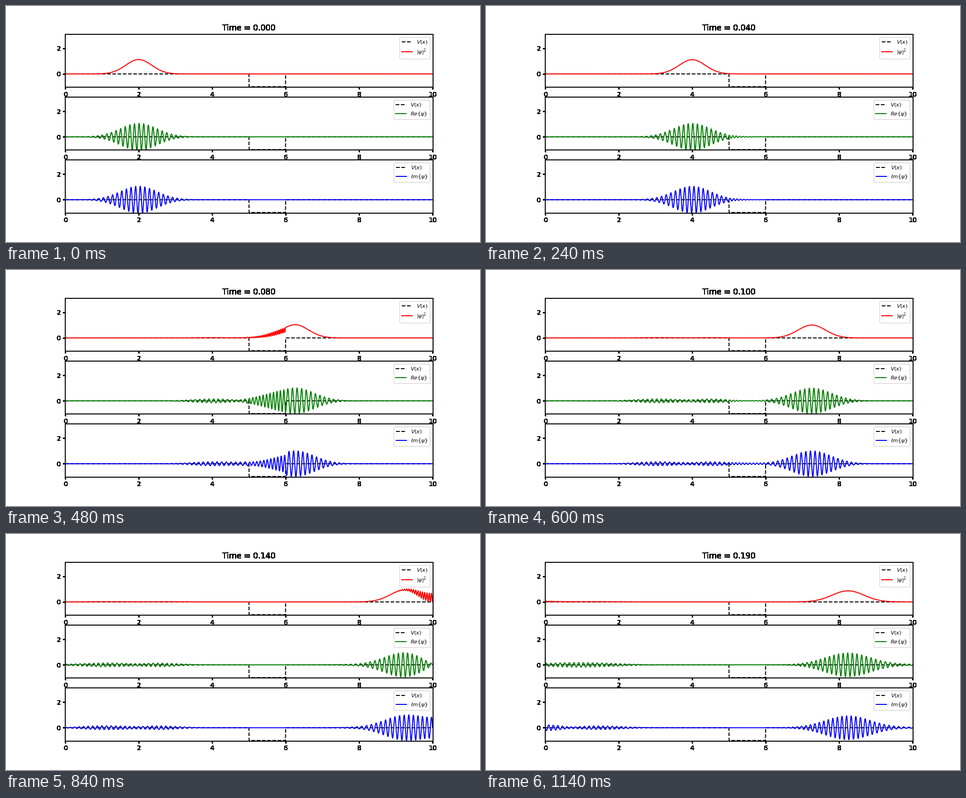
Animation of 1000x500 px, one loop 1.2 s. Source, as a matplotlib script:

```python
import numpy as np
import matplotlib.pyplot as plt
from matplotlib.animation import FuncAnimation

FRAMES, INTERVAL, DT = 20, 60, 0.01

# Wave packet in a box [0, L] with a square well on [A, B] (hbar = m = 1)
L, A, B, DEPTH = 10.0, 5.0, 6.0, 1000.0
K0, X0, SIGMA = 50.0, 2.0, 0.5
MODES = 600

x = np.linspace(0, L, 2001)
n = np.arange(1, MODES + 1)
basis = np.sqrt(2 / L) * np.sin(np.outer(x, n) * np.pi / L)


def well_integral(q):
    """Integral of cos(q pi x / L) over the well."""
    k = q * np.pi / L
    return (B - A) * np.cos(k * (A + B) / 2) * np.sinc(k * (B - A) / 2 / np.pi)


def solve():
    """Return psi at every time step, one row per step."""
    row, col = n[:, None], n[None, :]
    ham = -DEPTH / L * (well_integral(row - col) - well_integral(row + col))
    ham += np.diag((n * np.pi / L) ** 2 / 2)
    energy, states = np.linalg.eigh(ham)
    psi0 = np.exp(-(x - X0) ** 2 / (2 * SIGMA ** 2) + 1j * K0 * x)
    psi0 /= np.sqrt(SIGMA * np.sqrt(np.pi))
    coef = states.T @ (basis.T @ psi0) * (x[1] - x[0])
    times = np.arange(FRAMES) * DT
    phases = np.exp(-1j * np.outer(times, energy))
    return (phases * coef) @ (basis @ states).T


def harden(img, dpi):
    """Turn every touched pixel solid black, without soft edges."""
    out = np.zeros_like(img)
    out[..., 3] = img[..., 3] > 0
    return out, 0, 0


def style(ax):
    ax.set_xlim(0, L)
    ax.set_ylim(-1, 3.1)
    ax.set_xticks(range(0, 11, 2))
    ax.set_yticks([0, 2])


def add_frame(ax):
    """Hard-edged spines, ticks and labels behind the panel."""
    back = fig.add_axes(ax.get_position(), zorder=-1, label="back")
    back.patch.set_visible(False)
    style(back)
    for part in (back.xaxis, back.yaxis, *back.spines.values()):
        part.set_agg_filter(harden)


psi = solve()
potential = np.where((x > A) & (x < B), -1.0, 0.0)

fig, axes = plt.subplots(3, 1, figsize=(10, 5), dpi=100, facecolor="white")
fig.subplots_adjust(left=0.125, right=0.9, bottom=0.125, top=0.88, hspace=0.2)

panels = [
    ("r", r"$|\psi|^2$", np.abs(psi) ** 2),
    ("g", r"$Re\{\psi\}$", psi.real),
    ("b", r"$Im\{\psi\}$", psi.imag),
]
lines = []
for ax, (color, label, data) in zip(axes, panels):
    style(ax)
    ax.tick_params(length=0, labelbottom=False, labelleft=False)
    add_frame(ax)
    ax.plot(x, potential, "k--", label="$V(x)$")
    lines += ax.plot(x, data[0], color, label=label)
    ax.legend(fontsize=8, loc="upper right")

title = axes[0].set_title("Time = 0.000")
title.set_agg_filter(harden)


def update(i):
    for line, (_, _, data) in zip(lines, panels):
        line.set_ydata(data[i])
    title.set_text(f"Time = {i * DT:.3f}")
    return [*lines, title]


anim = FuncAnimation(fig, update, frames=FRAMES, interval=INTERVAL,
                     repeat=True, repeat_delay=0, blit=False)
plt.show()
```
